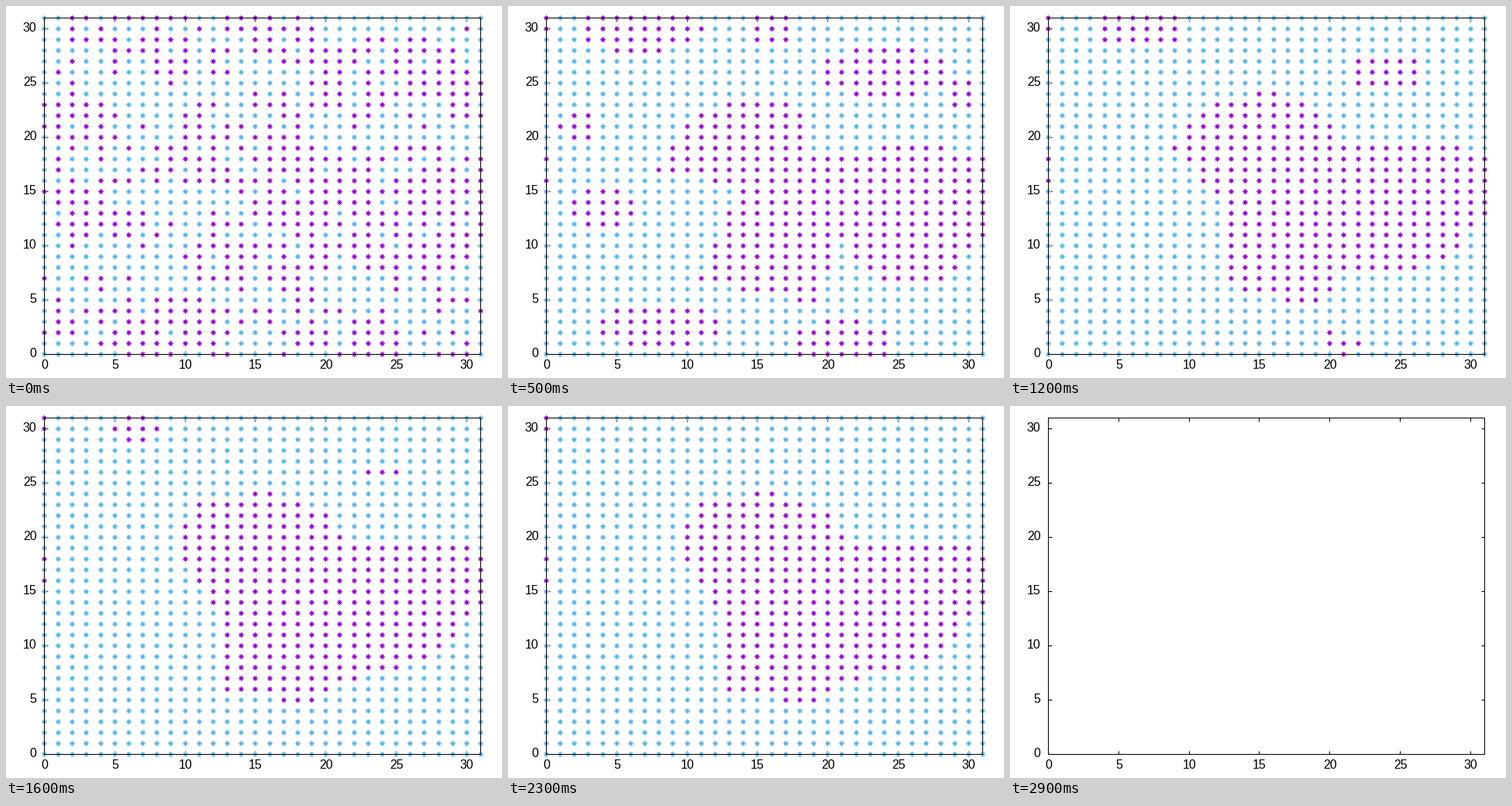
Write a matplotlib script that moves like this. It is 640 px wide and 480 px high and loops after 3 s.

```python
import numpy as np
import matplotlib.pyplot as plt
from matplotlib.animation import FuncAnimation
from matplotlib.path import Path

W, H, DPI = 640, 480, 80
PX = 72 / DPI                       # one pixel in points
HAIR = 0.99 * PX
N, FRAMES = 32, 30
LEFT, RIGHT, TOP, BOTTOM = 49, 612, 15, 449
UP, DOWN = "#9400d3", "#56b4e9"

COL, ROW = np.indices((N, N))
SITES = np.column_stack([COL.ravel(), ROW.ravel()])

# Outline of the surviving domain, early and relaxed.
EARLY = np.array([(7.6, 16.6), (9.6, 21.4), (15.6, 24.2), (18.4, 22.4),
                  (18.8, 18.4), (27, 19.4), (31.4, 18.4), (31.4, 10.6),
                  (28.4, 6.6), (23.5, 6.6), (20.8, 10.6), (19, 4.4),
                  (10.6, 7), (13.6, 15.6)])
LATE = np.array([(9, 20), (11, 23.4), (15.5, 24.2), (20.4, 22.4),
                 (21.6, 19.4), (29.5, 19.4), (31.4, 18.4), (31.4, 14.5),
                 (28.5, 9.6), (24, 7.5), (21.5, 6.6), (19.2, 4.3),
                 (12.6, 6), (12, 13)])

# Shrinking droplets: centre, radii, lifetime in frames.
DROPS = [
    (6.5, 30, 5.2, 2.6, 20),
    (8, 2.7, 6, 3, 11),
    (24, 26, 5.3, 3.2, 17),
    (21, 1, 4.6, 2.8, 14),
    (4, 13.5, 4, 3, 8),
    (16, 30, 3.5, 3.5, 7),
    (2.3, 21, 3.5, 3, 6),
    (29.5, 24, 2.5, 3, 7),
    (9, 28, 2, 3.5, 5),
    (1, 3, 1.5, 2.5, 4),
]
QUENCH = np.random.default_rng(7).normal(size=(N, N))


def blur(spins):
    """Mix each spin with its four periodic neighbours."""
    near = sum(np.roll(spins, d, axis) for d in (-1, 1) for axis in (0, 1))
    return 0.6 * spins + 0.1 * near


def spins_at(i):
    p = np.clip((i - 4) / 12, 0, 1)
    outline = Path((1 - p) * EARLY + p * LATE)
    domain = outline.contains_points(SITES).reshape(N, N)
    for cx, cy, rx, ry, life in DROPS:
        # curvature makes the area fall linearly with time
        domain |= ((COL - cx) / rx) ** 2 + ((ROW - cy) / ry) ** 2 < 1 - i / life
    heat = np.random.default_rng(i).normal(size=(N, N))
    noise = 0.13 * heat + 0.6 * np.exp(-i / 1.5) * QUENCH
    spins = blur(domain.astype(float)) + noise > 0.5
    if i:
        spins[0, [16, 18, 30, 31]] = True   # pinned on the left edge
    return spins


def px(x):
    return LEFT + x * (RIGHT - LEFT) / (N - 1)


def py(y):
    return BOTTOM - y * (BOTTOM - TOP) / (N - 1)


fig = plt.figure(figsize=(W / DPI, H / DPI), dpi=DPI, facecolor="white")
ax = fig.add_axes([0, 0, 1, 1])
ax.set(xlim=(0, W), ylim=(H, 0))
ax.axis("off")


def stroke(xs, ys, z):
    ax.plot(xs, ys, color="black", lw=HAIR, zorder=z, solid_capstyle="butt",
            solid_joinstyle="miter")


def label(x, y, value, align):
    ax.text(x, y, str(value), family="Liberation Sans", size=16 * PX,
            ha=align, va="baseline")


stroke([LEFT, RIGHT, RIGHT, LEFT, LEFT], [TOP, TOP, BOTTOM, BOTTOM, TOP], 5)
for v in range(0, N, 5):
    x, y = px(v), py(v)
    for a, b in ((BOTTOM, BOTTOM - 4.5), (TOP, TOP + 4.5)):
        stroke([x, x], [a, b], 1)
    for a, b in ((LEFT, LEFT + 4.5), (RIGHT, RIGHT - 4.5)):
        stroke([a, b], [y, y], 1)
    label(x + 0.7, 468.5, v, "center")
    label(39.7, y + 4.3, v, "right")


def dots(color, z):
    return ax.plot([], [], ls="", marker=(8, 2, 0), ms=6 * PX, mew=HAIR,
                   color=color, zorder=z)[0]


down, up = dots(DOWN, 2), dots(UP, 3)


def draw(i):
    shown = i < FRAMES - 1          # the loop ends on empty axes
    spins = spins_at(i)
    for art, mask in ((down, ~spins & shown), (up, spins & shown)):
        x, y = np.nonzero(mask)
        art.set_data(px(x), py(y))
    return down, up


anim = FuncAnimation(fig, draw, frames=FRAMES, interval=100, repeat=True)
plt.show()
```
